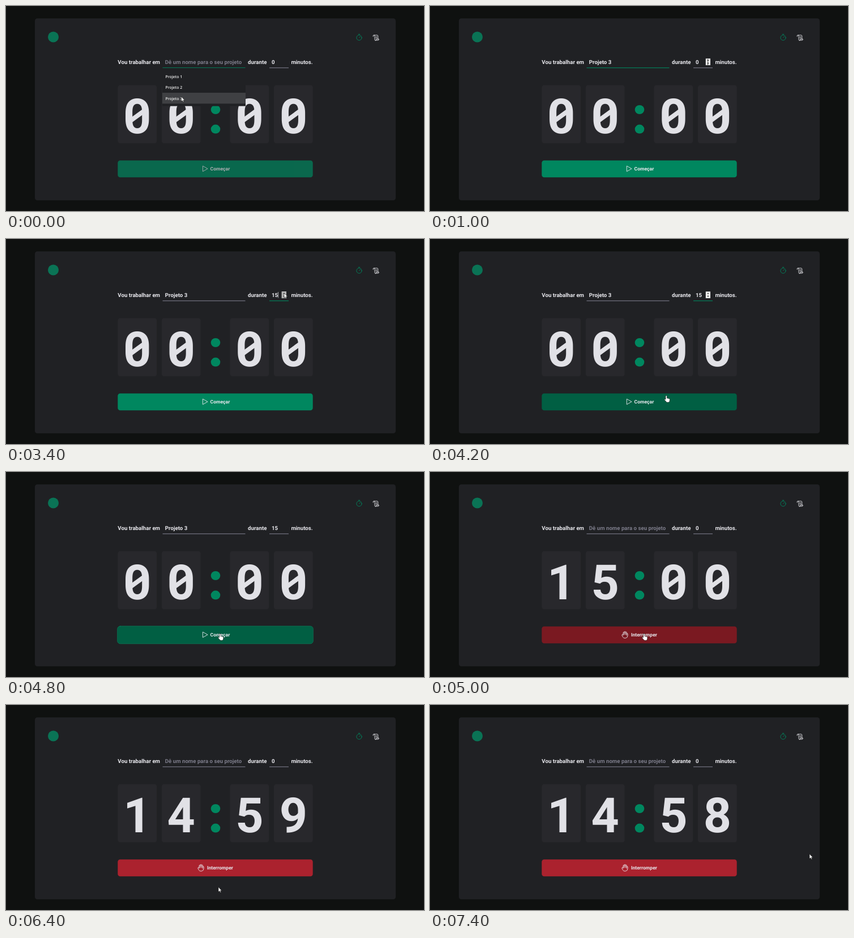
An HTML page that plays this animation: 738x364 px, repeating every 8000 ms.

```html
<!DOCTYPE html>
<html lang="pt">
<head>
<meta charset="utf-8">
<title>Timer</title>
<style>
  html, body { margin: 0; width: 100%; height: 100%; overflow: hidden; background: #0f1110; }
  svg { display: block; width: 100%; height: 100%; }
  text { font: 700 9.7px Roboto, sans-serif; fill: #e9e9ee; text-rendering: geometricPrecision; }
  .digits text { font-size: 86.1px; fill: #e1e1e6; text-anchor: middle; }
  .digits path { stroke: #e1e1e6; stroke-width: 8; }
  .card { fill: #28282c; }
  .list text { font: 600 6.9px "Open Sans", sans-serif; fill: #f0f0f0; }
  .button text { font-size: 8.6px; }
  .line { fill: none; stroke: #e9e9ee; stroke-width: .9; stroke-linecap: round; stroke-linejoin: round; }
  .green { stroke: #00875f; }
  .pointer { fill: #fff; stroke: #111; stroke-width: .6; stroke-linejoin: round; }
</style>
</head>
<body>
<svg viewBox="0 0 738 364" preserveAspectRatio="none">
  <rect x="51" y="22" width="637" height="323" rx="4.3" fill="#202124"/>
  <circle cx="83.5" cy="55" r="9.5" fill="#0a7355"/>

  <g class="line green">
    <circle cx="623.5" cy="56.3" r="4.6"/>
    <path d="M622.3 50.2h2.4M623.5 56.3l2-2"/>
  </g>
  <path class="line" d="M648.3 54.2A1.5 1.5 0 1 1 651 53.3V59.3A1.5 1.5 0 1 0 653.5 58.7H658.2A1.6 1.6 0 0 1 657 60.8H652.5M649.6 51.8H655.2A1.5 1.5 0 0 1 656.7 53.3V58.7M652.9 54.7H654.9M652.9 56.7H654.9"/>

  <text x="197.3" y="102.8">Vou trabalhar em</text>
  <text id="project" x="280.8" y="102.6"></text>
  <rect id="projectLine" x="276.5" y="109.2" width="146" height="1.1"/>
  <text x="427" y="102.8">durante</text>
  <text id="minutes" x="469" y="102.6"></text>
  <rect id="minutesLine" x="465" y="109.2" width="34" height="1.1"/>
  <rect id="caret" x="480.1" y="94" width=".7" height="10.5" fill="#e9e9ee"/>
  <g id="spinner">
    <rect x="486.8" y="93.3" width="8.2" height="11.8" fill="#f2f2f2"/>
    <rect id="spinnerHover" x="486.8" y="93.3" width="8.2" height="11.8" fill="#b4b4b4"/>
    <path d="M489 97.6l1.9-2.2 1.9 2.2zM489 100.8l1.9 2.2 1.9-2.2z" fill="#333"/>
  </g>
  <text x="503.4" y="102.8">minutos.</text>

  <g class="digits" id="digits"></g>
  <g fill="#00875f">
    <ellipse cx="370" cy="184" rx="8.3" ry="8"/>
    <ellipse cx="370" cy="218.6" rx="8.3" ry="8"/>
  </g>

  <g class="list" id="list">
    <rect x="276" y="110.3" width="147" height="67.4" fill="#202124"/>
    <rect x="276" y="154" width="147" height="19.4" fill="#3f4043"/>
    <text x="281.4" y="127.7">Projeto 1</text>
    <text x="281.4" y="147.1">Projeto 2</text>
    <text x="281.4" y="166.5">Projeto 3</text>
  </g>

  <g class="button" id="button">
    <rect id="face" x="197.3" y="274.3" width="344.4" height="30" rx="4.3"/>
    <rect id="ring" x="196.8" y="273.8" width="345.4" height="31" rx="4.8" class="line green"/>
    <g id="start">
      <path class="line" d="M347.4 284.4V293.8L355.7 289.1z"/>
      <text x="360.5" y="291.9">Começar</text>
    </g>
    <g id="stop">
      <path class="line" d="M341.2 287.2V285.2a1 1 0 0 1 2 0V288.5M343.2 285V284.2a1 1 0 0 1 2 0V288.5M345.2 285a1 1 0 0 1 2 0V290M347.2 287.5a.95 .95 0 0 1 1.9 0V290.2a4.8 4.8 0 0 1-9 2.4L338.9 289.8a1 1 0 0 1 1.7-1L341.2 289.8V287"/>
      <text x="355" y="291.9">Interromper</text>
    </g>
  </g>

  <path id="pointer" class="pointer"/>
</svg>
<script>
const LOOP = 8000, STEP = 100;
const PICK = 400, FOCUS = 1300, PRESS = 4800, START = 5000;
const $ = id => document.getElementById(id);
const show = (id, on) => $(id).setAttribute('visibility', on ? 'visible' : 'hidden');
const fill = (id, color) => $(id).setAttribute('fill', color);

const SHAPES = {
  arrow: 'M0 0V8.6L2 6.8 3.3 9.6 4.7 9 3.4 6.3H6Z',
  hand: 'M0 1.2a1.2 1.2 0 0 1 2.4 0V4.6L6.5 5.4Q7.6 5.7 7.5 7L7 10.2Q6.6 12 5 12H2.6Q1.6 12 1 11L-2 7.4Q-2.4 6-1 6.2L0 7Z',
  beam: 'M-1.2-4.5H1.2M0-4.5V4.5M-1.2 4.5H1.2'
};

// time, x, y
const PATH = [
  [0, 309.5, 161], [400, 309.5, 161], [600, 350, 143], [800, 446, 112],
  [1000, 490.5, 99.5], [1200, 491, 96], [3400, 491, 96], [3700, 470, 175],
  [4000, 426, 264], [4200, 416, 278], [4600, 384, 286], [4800, 376.5, 287],
  [5300, 376.5, 287], [5900, 320, 292], [6200, 325, 314], [6500, 400, 328],
  [6800, 535, 338], [7100, 635, 332], [7200, 655, 302], [7400, 670, 264.5],
  [LOOP, 670, 264.5]
];

function pointerAt(t) {
  const i = PATH.findIndex(p => p[0] > t);
  const [a, b] = [PATH[i - 1], PATH[i]];
  const k = (t - a[0]) / (b[0] - a[0]);
  return [a[1] + (b[1] - a[1]) * k, a[2] + (b[2] - a[2]) * k];
}

const CARDS = [231.8, 309.3, 429.9, 507.4];
$('digits').innerHTML = CARDS.map(x =>
  `<rect class="card" x="${x - 34.4}" y="140.4" width="68.8" height="103.3" rx="4.3"/>
   <text x="${x}" y="225.8"></text><path d="M${x - 13} 204.5L${x + 13} 185.5"/>`).join('');
const digitTexts = $('digits').querySelectorAll('text');
const slashes = $('digits').querySelectorAll('path');

function drawClock(seconds) {
  const two = n => String(n).padStart(2, '0');
  [...two(Math.floor(seconds / 60)) + two(seconds % 60)].forEach((d, i) => {
    digitTexts[i].textContent = d;
    slashes[i].setAttribute('visibility', d === '0' ? 'visible' : 'hidden');
  });
}

function drawForm(t, onSpinner) {
  const chosen = t >= PICK && t < START;
  const editing = t >= FOCUS && t < PRESS;
  const value = t < FOCUS || t >= START ? 0 : t < 1600 ? 5 : t < 2100 ? 10 : 15;
  $('project').textContent = chosen ? 'Projeto 3' : 'Dê um nome para o seu projeto';
  $('project').style.fill = chosen ? '#e9e9ee' : '#7c7c8a';
  $('minutes').textContent = value;
  fill('projectLine', t < FOCUS ? '#00875f' : '#7c7c8a');
  fill('minutesLine', editing ? '#00875f' : '#7c7c8a');
  show('caret', (t >= 1600 && t < 2600) || (t >= 3100 && t < 3600));
  show('spinner', editing || onSpinner);
  show('spinnerHover', onSpinner && t >= 1200);
  show('list', t < PICK);
}

function drawButton(t, hover) {
  const running = t >= START;
  const [normal, dark] = running ? ['#ab222e', '#7a1921'] : ['#00875f', '#015f43'];
  fill('face', hover ? dark : normal);
  $('button').setAttribute('opacity', t < PICK ? .7 : 1);
  show('ring', t >= PRESS && !running);
  show('start', !running);
  show('stop', running);
}

function draw(t) {
  const [x, y] = pointerAt(t);
  const onButton = x > 197 && x < 542 && y > 274 && y < 304;
  const onSpinner = x > 465 && x < 499 && y > 90 && y < 110;
  const shape = onButton ? 'hand' : onSpinner && t < 1200 ? 'beam' : 'arrow';
  $('pointer').setAttribute('d', SHAPES[shape]);
  $('pointer').setAttribute('transform', `translate(${x} ${y})`);
  drawForm(t, onSpinner);
  drawButton(t, onButton);
  drawClock(t < START ? 0 : 900 - Math.floor((t - START) / 1000));
}

const begin = performance.now();
function tick() {
  const t = (performance.now() - begin) % LOOP;
  draw(Math.floor(t / STEP) * STEP);
  requestAnimationFrame(tick);
}
tick();
</script>
</body>
</html>
```
